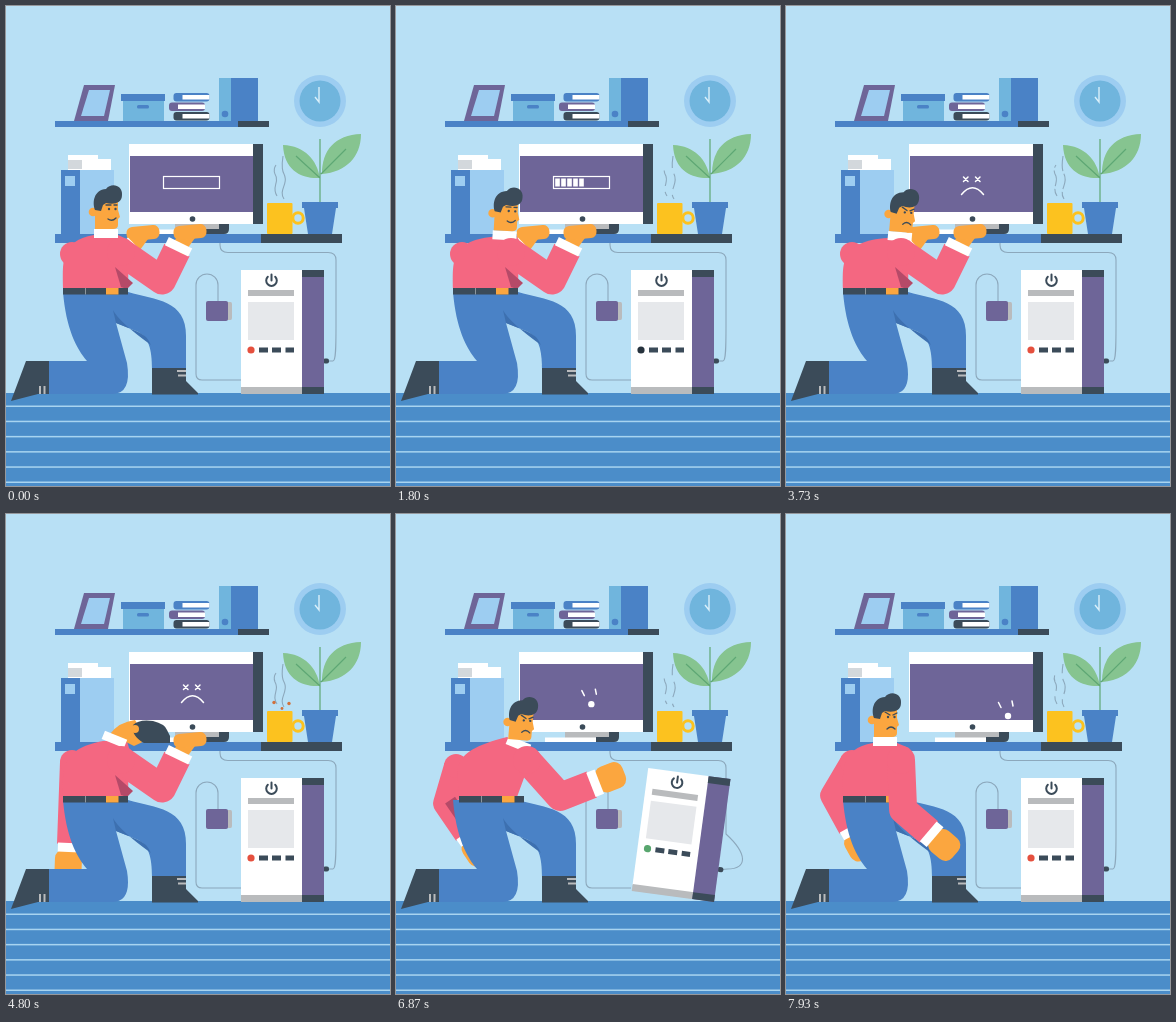
Recreate the animation shown at these times as an HTML page. Size 384x480 px, loop 8 s.

```html
<!DOCTYPE html>
<html lang="en">
<head>
<meta charset="utf-8">
<title>Computer trouble</title>
<style>
  html, body { margin: 0; width: 100%; height: 100%; overflow: hidden; background: #b8e0f5; }
  svg { display: block; width: 100%; height: 100%; }
  .blue { fill: #4a82c6; }
  .sky { fill: #70b5dd; }
  .pale { fill: #9dcdf1; }
  .dark { fill: #3b4b59; }
  .purple { fill: #6e6598; }
  .white { fill: #fff; }
  .grey { fill: #b9bbbd; }
  .pink { fill: #f46781; }
  .skin { fill: #fba63f; }
  .wine { fill: #b54a68; }
  .line { fill: none; stroke: #8ca8bc; stroke-width: 1.1; }
  .ink { fill: none; stroke: #3b4b59; stroke-width: 1.3; stroke-linecap: round; }
  .glow { fill: none; stroke: #fff; stroke-width: 1.5; stroke-linecap: round; }
  .sleeve { fill: none; stroke: #f46781; stroke-linejoin: round; }
  .inner { stroke: #b54a68; }
  .cuff { stroke: #fff; }
  .palm { stroke: #fba63f; stroke-width: 15; }
</style>
</head>
<body>
<svg viewBox="0 0 384 480" xmlns="http://www.w3.org/2000/svg">
  <rect width="384" height="480" fill="#b8e0f5"/>
  <g id="floor"><rect y="387" width="384" height="93" fill="#4b8dc9"/></g>

  <!-- upper shelf -->
  <path class="purple" d="M68 115 78 79H109L102 115Z"/>
  <path class="pale" d="M75 110 83 84H104L98 110Z"/>
  <rect class="sky" x="117" y="95" width="41" height="20"/>
  <rect class="blue" x="115" y="88" width="44" height="7"/>
  <rect class="blue" x="131" y="99" width="12" height="3.5" rx="1.5"/>
  <g id="books"></g>
  <rect class="sky" x="213" y="72" width="12" height="43"/>
  <rect class="blue" x="225" y="72" width="27" height="43"/>
  <circle class="blue" cx="219" cy="108" r="3.3"/>
  <rect class="blue" x="49" y="115" width="184" height="6"/>
  <rect class="dark" x="232" y="115" width="31" height="6"/>

  <circle class="pale" cx="314" cy="95" r="26"/>
  <circle class="sky" cx="314" cy="95" r="20.5"/>
  <path d="M313 81V96L309 91" fill="none" stroke="#d9effa" stroke-width="1.4"/>

  <!-- desk -->
  <path class="white" d="M62 149H92V153H105V166H62Z"/>
  <path fill="#d3d8dc" d="M62 154H76V163H62Z"/>
  <path class="pale" d="M74 164H108V228H74Z"/>
  <path class="blue" d="M55 164H74V228H55Z"/>
  <rect class="pale" x="59" y="170" width="10" height="10"/>

  <path class="grey" d="M169 218H213V224H169Z"/>
  <path class="white" d="M149 223.500H213V228H149Z"/>
  <path class="dark" d="M200 223H213V218H223V223Q223 228 218 228H200Z"/>
  <path class="white" d="M123 138H248V218H123Z"/>
  <path class="dark" d="M247 138H257V218H247Z"/>
  <path class="purple" d="M124 150H247V206H124Z"/>
  <circle class="dark" cx="186.500" cy="213" r="2.8"/>
  <g id="loader"><rect x="157.500" y="170.500" width="56" height="12" fill="none" stroke="#fff" stroke-width="1.2"/><g id="bars"></g></g>
  <g id="sad" class="glow">
    <path d="M177.500 171l4.500 4.500m0-4.500l-4.500 4.500M189.500 171l4.500 4.500m0-4.500l-4.500 4.500M175.500 188.500Q186.500 175 197.500 188.500"/>
  </g>
  <g id="gasp"><path class="glow" d="M-9.500-13.500l2.500 5M4-15l1 5"/><circle class="white" r="3.2"/></g>

  <g id="steam" class="line">
    <path d="M271 190C265 181 274 176 269 168Q267 163 270 159"/>
    <path d="M278 193C272 184 283 178 278 168Q275 163 277 150"/>
  </g>
  <g id="drops" fill="#d0703c"><circle cx="268" cy="188" r="1.7"/><circle cx="283" cy="189" r="1.7"/><circle cx="276" cy="194" r="1.4"/></g>
  <rect x="261" y="197" width="25.500" height="31" rx="1" fill="#fcc21f"/>
  <circle cx="292" cy="212" r="5.200" fill="none" stroke="#fcc21f" stroke-width="3"/>

  <path fill="#86c490" d="M314 172C295 173 278 164 277 139C299 140 311 154 314 172ZM316 168C316 144 329 129 355 128C355 151 340 166 316 168Z"/>
  <path d="M314 133V197M314 172L290 150M315 168L340 143" fill="none" stroke="#5ea774" stroke-width="1.2"/>
  <path class="blue" d="M296 196H332V202H330L326 228H302L298 202H296Z"/>

  <path class="blue" d="M49 228H256V237H49Z"/>
  <path class="dark" d="M255 228H336V237H255Z"/>

  <!-- cables and tower -->
  <path class="line" d="M235 374H196Q190 374 190 368V279A11 11 0 0 1 212 279V296"/>
  <path class="grey" d="M220 296H224.500Q226 296 226 298V312Q226 314 224.500 314H220Z"/>
  <rect class="purple" x="200" y="295" width="22" height="20" rx="2"/>
  <path class="line" id="cable"/>
  <g id="tower">
    <rect class="dark" x="317" y="352.500" width="6" height="5" rx="2"/>
    <path class="white" d="M235 264H297V382H235Z"/>
    <path class="grey" d="M235 381H297V388H235Z"/>
    <path class="purple" d="M296 264H318V388H296Z"/>
    <path class="dark" d="M296 264H318V271H296ZM296 381H318V388H296Z"/>
    <path class="ink" d="M261.800 270.800A5.300 5.300 0 1 0 269.200 270.800M265.500 268.500V274.500" style="stroke-width:2"/>
    <rect class="grey" x="242" y="284" width="46" height="6"/>
    <rect x="242" y="296" width="46" height="38" fill="#e6e8eb"/>
    <circle id="led" cx="245" cy="344" r="3.600"/>
    <path class="dark" d="M253 341.500h9v5h-9zM266 341.500h9v5h-9zM279.500 341.500h8.500v5h-8.500z"/>
  </g>

  <!-- man -->
  <g id="farArm"></g>
  <path class="blue" d="M57 286H122C150 294 180 294 180 330V363H146C146 344 143 330 130 325L110 317L121 357Q126 388 106 388H43V355H81C70 342 60 322 57 286Z"/>
  <path fill="#3d70b0" d="M107 304Q113 316 145 339Q141 329 130 325L110 317Z"/>
  <path class="dark" d="M20 355H43V388H32L5 395ZM146 362H180V375L192 387V388.500H146Z"/>
  <path d="M34 380V388M38.500 380V388M171 365H180M172 369.500H180" stroke="#b9bbbd" stroke-width="2"/>
  <path class="pink" id="torso"/>
  <path class="wine" id="shade" d="M109 261L127 277L121 283L115 281Z"/>
  <g id="belt"><path class="dark" d="M57 282H122V288.500H57Z"/><path d="M79.500 282V288.500" stroke="#8b969e"/><path class="skin" d="M100 282H112.500V288.500H100Z"/></g>
  <g id="nape">
    <path class="skin" d="M-5-2Q4-14 20-16L32 4L19 10Z"/>
    <path class="dark" d="M18-11Q24-17 38-15Q50-12 52-6L55 0V7H29Q16 0 18-11Z"/>
    <circle class="skin" cx="20" cy="-7" r="4"/>
  </g>
  <path class="white" id="collar" d="M-12-3H12V6H-12Z"/>
  <g id="head">
    <circle class="skin" cx="-13" cy="-18" r="4.300"/>
    <path class="skin" d="M-9-31H12V-20L14-13L12-11V-5Q12-1 7-1H-11V-16Z"/>
    <path class="dark" d="M-11-20C-14-28-12-40 0-41C5-48 17-45 16-35C16-27 8-25 0-27L-3-25L-5-19Z"/>
    <circle class="dark" cx="3" cy="-21" r="1.200"/><circle class="dark" cx="9.500" cy="-21" r="1.200"/>
    <path class="ink" id="brows"/><path class="ink" id="mouth"/>
  </g>
  <g id="nearArm"></g>
</svg>
<script>
const LOOP = 8000, FAIL = 3600, SLAM = 4680, HIT = 6780;
const $ = id => document.getElementById(id);
const range = n => [...Array(n).keys()];
const clamp = (v, lo = 0, hi = 1) => Math.min(hi, Math.max(lo, v));
const ease = u => u * u * (3 - 2 * u);
const mix = (a, b, k) => a + (b - a) * k;
const set = (el, attrs) => { for (const name in attrs) el.setAttribute(name, attrs[name]); };
const show = (id, visible) => set($(id), { visibility: visible ? 'visible' : 'hidden' });

$('floor').innerHTML += range(6).map(i =>
  `<rect y="${399.5 + i * 15.2}" width="384" height="1.5" fill="#a8d4f0"/>`).join('');
$('bars').innerHTML = range(9).map(i =>
  `<rect class="white" x="${159.2 + i * 6}" y="172.500" width="4.600" height="8"/>`).join('');
$('books').innerHTML = ['blue', 'purple', 'dark'].map((color, i) => {
  const x = i === 1 ? 163 : 167.5, y = 87 + i * 9.5;
  return `<rect class="${color}" x="${x}" y="${y}" width="36" height="8.500" rx="3"/>
    <rect class="white" x="${x + 9}" y="${y + 2}" width="27" height="4.500"/>`;
}).join('');
for (const id of ['farArm', 'nearArm']) {
  $(id).innerHTML = '<path class="sleeve"/><circle class="pink"/><path class="inner"/><path class="palm"/><rect class="skin"/><path class="cuff"/>';
}

// A pose is where the neck and wrists are; shoulders and elbows follow.
const REST = { neck: [100, 224], tilt: 0, lean: 0, far: [124, 245], near: [171, 244], farFlat: 1, nearFlat: 1 };
const WATCH = { ...REST, neck: [114, 227], tilt: 5 };
const SLUMP = { ...REST, neck: [109, 222], tilt: 95, far: [63, 330], farFlat: 0 };
const RAISE = { ...REST, neck: [82, 226], tilt: -15, far: [36, 201], near: [135, 202], farFlat: 0, nearFlat: 0 };
const RECOIL = { ...RAISE, neck: [123, 227], tilt: 5, lean: 1, far: [70, 320], near: [166, 283] };
const PUNCH = { ...RECOIL, near: [197, 270] };
const DROOP = { ...RAISE, neck: [99, 224], tilt: 0, far: [64, 314], near: [143, 318] };
const ACTS = [
  [REST, 0, 700], [WATCH, 2600, 4400], [SLUMP, SLAM, 5250], [RAISE, 5700, 6350],
  [PUNCH, HIT, HIT + 40], [RECOIL, 7250, 7400], [DROOP, 7800, LOOP],
].map(([pose, from, to]) => ({ joints: resolve(pose), from, to }));

function elbow([sx, sy], [wx, wy], upper, lower, side) {
  const dx = wx - sx, dy = wy - sy, d = Math.hypot(dx, dy);
  const along = (d * d + upper * upper - lower * lower) / (2 * d);
  const out = side * Math.sqrt(Math.max(0, upper * upper - along * along));
  return [sx + (dx * along - dy * out) / d, sy + (dy * along + dx * out) / d];
}
function resolve(pose) {
  const farShoulder = [66 - 6 * pose.lean, 248 + 4 * pose.lean];
  const nearShoulder = [115 + 16 * pose.lean, 246];
  const raised = pose.far[1] < 220;
  return {
    ...pose, farShoulder, nearShoulder,
    farElbow: elbow(farShoulder, pose.far, 39, 37, raised ? -1 : 1),
    nearElbow: elbow(nearShoulder, pose.near, 50, 34, 1),
  };
}
function poseAt(t) {
  const i = ACTS.findIndex(act => t < act.to), b = ACTS[i];
  if (t >= b.from) return b.joints;
  const a = ACTS[i - 1], k = ease((t - a.to) / (b.from - a.to));
  return Object.fromEntries(Object.entries(a.joints).map(([key, v]) => {
    const w = b.joints[key];
    return [key, Array.isArray(v) ? v.map((n, j) => mix(n, w[j], k)) : mix(v, w, k)];
  }));
}

function drawArm(id, [sx, sy], [ex, ey], [wx, wy], flat, width, shade) {
  const [sleeve, shoulder, inner, palm, hand, cuff] = $(id).children;
  const len = Math.hypot(wx - ex, wy - ey) || 1;
  const dx = (wx - ex) / len, dy = (wy - ey) / len;
  const hx = wx + mix(dx * 20, 13, flat), hy = wy + mix(dy * 20, -18, flat);
  const w = mix(29, 33, flat), h = mix(27, 14, flat), q = width / 4;
  const turn = mix(Math.atan2(dy, dx) * 180 / Math.PI, -5, flat);
  set(sleeve, { d: `M${sx} ${sy}L${ex} ${ey}L${wx} ${wy}`, 'stroke-width': width });
  set(shoulder, { cx: sx, cy: sy, r: width / 2 });
  set(inner, { d: `M${ex + dy * q} ${ey - dx * q}L${wx + dy * q} ${wy - dx * q}`, 'stroke-width': q * 2, opacity: shade });
  set(palm, { d: `M${wx} ${wy}L${hx} ${hy}` });
  set(hand, { x: hx - w / 2, y: hy - h / 2, width: w, height: h, rx: mix(9, 6, flat), transform: `rotate(${turn} ${hx} ${hy})` });
  set(cuff, { d: `M${wx - dx} ${wy - dy}l${dx * 9} ${dy * 9}`, 'stroke-width': width - 2 });
}

function drawMan(t) {
  const p = poseAt(t), [x, y] = p.neck;
  const faceDown = p.tilt > 45, happy = t < FAIL;
  show('head', !faceDown);
  show('nape', faceDown);
  set($('head'), { transform: `translate(${x} ${y}) rotate(${p.tilt})` });
  set($('nape'), { transform: `translate(${x} ${y})` });
  set($('collar'), { transform: `translate(${x} ${y + 2}) rotate(${Math.min(p.tilt, 22) + 17 * p.lean})` });
  set($('brows'), { d: happy ? 'M0-25H5M8-25H11' : 'M0-26L5-23M8-23L12-25' });
  set($('mouth'), { d: happy ? 'M2-11Q6-8 10-12' : 'M2-9Q6-13 10-9' });

  const left = 57 + 6 * p.lean, right = 122 - p.lean;
  const [lx, ly] = p.farShoulder, [rx, ry] = p.nearShoulder;
  const drop = 5 + 4 * p.lean;
  set($('torso'), { d: `M${left} 283C${left} 258 ${lx - 13} ${ly - 13} ${x - 12} ${y + 5 - drop * p.lean}L${x + 12} ${y + drop}L${rx + 8} ${ry - 12}L${right} 283Z` });
  set($('shade'), { opacity: 1 - p.lean });
  set($('belt'), { transform: `translate(${6 * p.lean} 0)` });
  drawArm('farArm', p.farShoulder, p.farElbow, p.far, p.farFlat, 24, p.lean);
  drawArm('nearArm', p.nearShoulder, p.nearElbow, p.near, p.nearFlat, 28, 0);
}

function drawTower(t) {
  const period = 733, since = clamp(t - HIT, 0, period * 1.5);
  const angle = 12 * Math.sin(2 * Math.PI * since / period) * Math.exp(-since / 1000);
  const pivot = angle > 0 ? 318 : 235, a = angle * Math.PI / 180;
  set($('tower'), { transform: `rotate(${angle} ${pivot} 388)` });
  const x = pivot + (322 - pivot) * Math.cos(a) + 33 * Math.sin(a);
  const y = 388 + (322 - pivot) * Math.sin(a) - 33 * Math.cos(a);
  const bend = 330 + Math.max(0, x - 322) * 5;
  set($('cable'), { d: `M214 237V239Q214 246.500 222 246.500H322Q330 246.500 330 254V320C${bend} 340 ${bend} 355 ${x + 5} 355Q${x + 2} 355 ${x} ${y}` });
  const blink = t % 533, dark = blink > 180 && blink < 340;
  const green = t > HIT && t < 7600;
  set($('led'), { fill: dark ? '#26323d' : green ? '#58a66e' : '#e5503e' });
}

function drawScreen(t) {
  show('loader', t < FAIL);
  const filled = Math.floor(8 * (1 - Math.exp(-t / 1800)));
  [...$('bars').children].forEach((bar, i) => set(bar, { opacity: i < filled ? 1 : 0 }));
  show('sad', t >= FAIL && t < HIT);
  show('gasp', t >= HIT);
  const slide = ease(clamp((t - HIT) / 270));
  set($('gasp'), { transform: `translate(${mix(186, 222, slide)} ${mix(186, 202, slide)})` });
}

function drawMug(t) {
  const gap = 7 * Math.sin(Math.PI * t / 4800) ** 2;
  set($('steam'), { 'stroke-dasharray': `16 ${gap}`, 'stroke-dashoffset': -t * .018 });
  const u = (t - SLAM) / 320;
  show('drops', u > 0 && u < 1);
  set($('drops'), { transform: `translate(0 ${8 - 32 * u * (1 - u)})` });
}

function draw(t) {
  drawScreen(t);
  drawMug(t);
  drawTower(t);
  drawMan(t);
}
let start;
function tick(now) {
  start ??= now;
  draw((now - start) % LOOP);
  requestAnimationFrame(tick);
}
draw(0);
requestAnimationFrame(tick);
</script>
</body>
</html>
```
